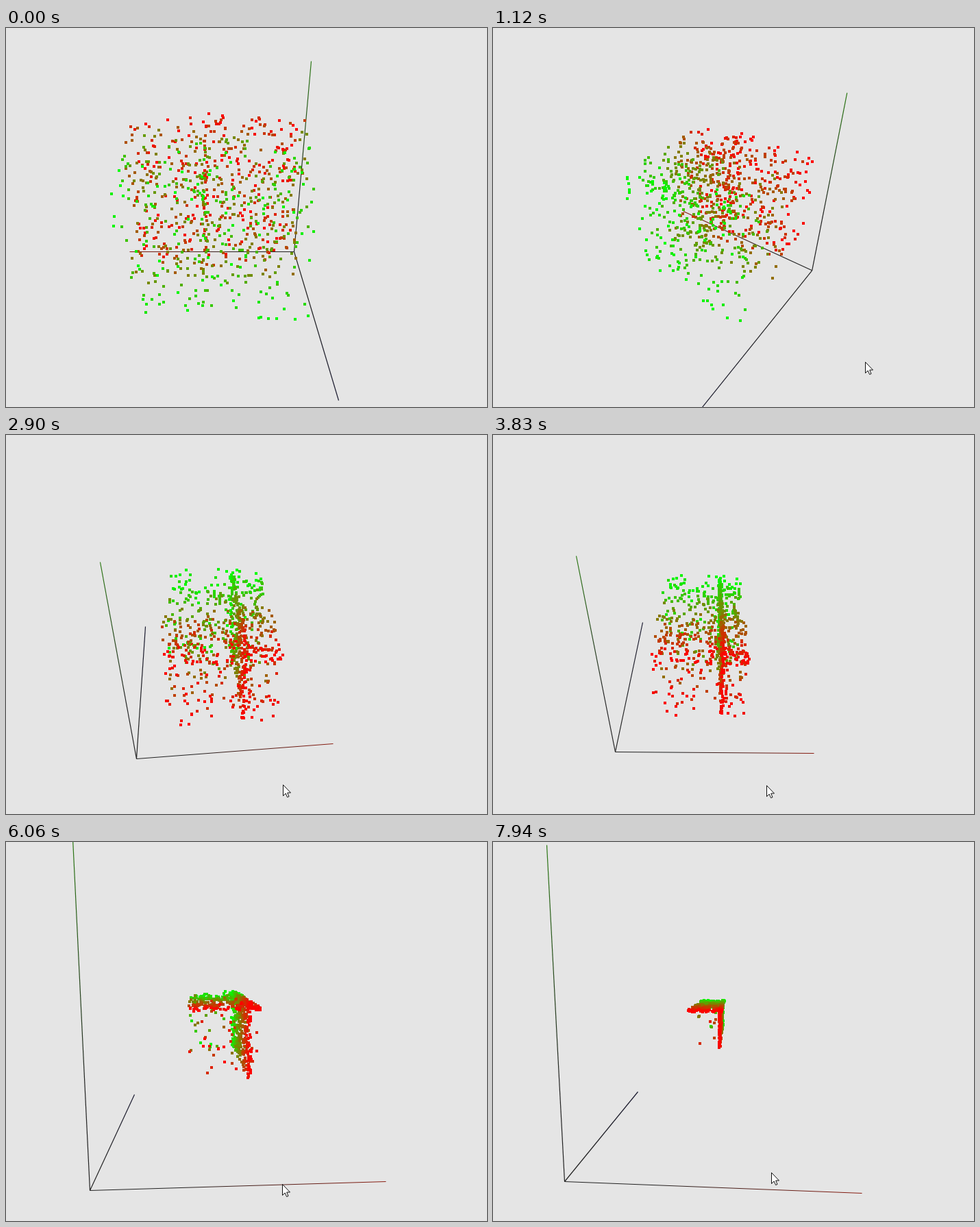
Recreate the animation shown at these times as an HTML page with a canvas. Size 702 by 553 pixels, loop 8000 ms.

```html
<!DOCTYPE html>
<html lang="en">
<head>
<meta charset="utf-8">
<title>Point cloud</title>
<style>
  html, body { margin: 0; height: 100%; overflow: hidden; background: #e5e5e5; }
  canvas { display: block; }
</style>
</head>
<body>
<canvas id="stage" width="702" height="553"></canvas>
<script>
const ctx = document.getElementById('stage').getContext('2d');
const LOOP = 8000;
const CORNER = [0.53, 0.54];   // the cloud settles on the planes x and y through here
const TIPS = ['#8a1c10', '#2c7a14', '#1a1a30'];

// yaw in degrees, screen points of origin and x, y, z tips, depth of the tips relative to the origin
const POSES = [
  [180, [420, 326], [180, 326], [445, 48], [485, 543], [1, 0.82, 0.637]],
  [138, [465, 353], [277, 267], [516, 94], [287, 576], [1.27, 0.757, 0.67]],
  [46, [305, 511], [485, 361], [303, 222], [128, 343], [1.3, 0.63, 1.34]],
  [4.6, [190, 472], [477, 450], [137, 185], [203, 279], [1.035, 0.69, 1.38]],
  [-0.5, [178, 462], [468, 464], [121, 176], [218, 273], [0.997, 0.69, 1.44]],
  [2.7, [122, 508], [554, 495], [97, -5], [187, 368], [1.035, 0.885, 1.75]],
  [-3.4, [104, 495], [538, 512], [78, 4], [211, 364], [0.955, 0.886, 1.8]]
].map(toCamera);

// time, pose number
const POSE_TRACK = [[0, 0], [850, 0], [1120, 1], [1820, 2], [2600, 2.9], [2900, 3], [3590, 4],
  [4640, 4], [5900, 5], [6950, 5], [7330, 5.9], [7940, 6]];

// time, x, y
const CURSOR_TRACK = [[500, 579, 528], [850, 579, 480], [1120, 543, 487], [1820, 443, 505],
  [2660, 404, 510], [2900, 404, 510], [3590, 399, 511], [4640, 399, 511], [5900, 403, 499],
  [6580, 403, 499], [6750, 413, 499], [7000, 412, 499], [7400, 406, 482]];

function mix(a, b, k) { return a.map((v, i) => v + (b[i] - v) * k); }

function combine(a, ka, b, kb) { return a.map((v, i) => v * ka + b[i] * kb); }

function sample(track, t) {
  const i = track.findIndex(key => key[0] > t);
  if (i < 0) return track[track.length - 1].slice(1);
  if (i === 0) return track[0].slice(1);
  const a = track[i - 1], b = track[i];
  return mix(a, b, (t - a[0]) / (b[0] - a[0])).slice(1);
}

// Homogeneous vectors with the yaw taken out, around the middle of the axes' cube
function toCamera([yaw, origin, x, y, z, depth]) {
  const o = [...origin, 1];
  const [ex, ey, ez] = [x, y, z].map((p, i) =>
    [...p, 1].map((v, j) => v * depth[i] - o[j]));
  const pivot = o.map((v, i) => v + (ex[i] + ey[i] + ez[i]) / 2);
  const r = yaw * Math.PI / 180, c = Math.cos(r), s = Math.sin(r);
  const parts = [pivot, combine(ex, c, ez, -s), ey, combine(ex, s, ez, c)];
  return [r, ...parts.map(v => v.map(n => n / pivot[2]))];
}

function cameraAt(t) {
  const [q] = sample(POSE_TRACK, t);
  const i = Math.min(Math.floor(q), POSES.length - 2), k = q - i;
  const a = POSES[i], b = POSES[i + 1];
  const yaw = a[0] + (b[0] - a[0]) * k;
  const [pivot, right, ey, ahead] = [1, 2, 3, 4].map(n => mix(a[n], b[n], k));
  const c = Math.cos(yaw), s = Math.sin(yaw);
  const ex = combine(right, c, ahead, s), ez = combine(right, -s, ahead, c);
  return (x, y, z) => {
    const [u, v, w] = pivot.map((p, j) =>
      p + ex[j] * (x - 0.5) + ey[j] * (y - 0.5) + ez[j] * (z - 0.5));
    return [u / w, v / w, w];
  };
}

let seed = 7;
function rnd() {
  seed = (seed * 1664525 + 1013904223) % 4294967296;
  return seed / 4294967296;
}

const points = Array.from({ length: 820 }, () => {
  const z = Math.pow(rnd(), 1.25), g = Math.round(z * 255);
  return {
    dx: rnd() < 0.58 ? -0.5 * rnd() : 0.39 * rnd(),
    dy: rnd() < 0.68 ? -0.54 * rnd() : 0.23 * rnd(),
    z: z * 0.6,
    onX: rnd() < 0.57,
    snap: rnd() < 0.03 ? 9 : 8.4 * rnd() - 1.3,
    jitter: (rnd() - 0.5) * 0.022,
    color: `rgb(${255 - g},${g},0)`
  };
});

function place(p, sec) {
  const s = 1 - 0.1 * sec, far = Math.pow(s, 2.6);
  const loose = Math.max(0, Math.min(1, (p.snap - sec) / 0.3));
  const shrink = d => d * (d < 0 ? s : far);
  const off = (d, pulled) => pulled ? shrink(d) * loose + p.jitter * s : shrink(d);
  return [CORNER[0] + off(p.dx, p.onX), CORNER[1] + off(p.dy, !p.onX), p.z];
}

function drawAxes(project) {
  const [ox, oy] = project(0, 0, 0);
  TIPS.forEach((tip, i) => {
    const [x, y] = project(+(i === 0), +(i === 1), +(i === 2));
    const shade = ctx.createLinearGradient(ox, oy, x, y);
    shade.addColorStop(0, '#222');
    shade.addColorStop(0.3, '#222');
    shade.addColorStop(1, tip);
    ctx.strokeStyle = shade;
    ctx.lineWidth = 1.2;
    ctx.beginPath();
    ctx.moveTo(ox + 0.5, oy + 0.5);
    ctx.lineTo(x + 0.5, y + 0.5);
    ctx.stroke();
  });
}

function drawCloud(project, sec) {
  points.map(p => [project(...place(p, sec)), p.color])
    .sort((a, b) => b[0][2] - a[0][2])
    .forEach(([[x, y], color]) => {
      ctx.fillStyle = color;
      ctx.fillRect(Math.round(x) - 2, Math.round(y) - 2, 4, 4);
    });
}

const arrow = new Path2D('M.5 .5V16.5L4.2 13L6.6 18.5L9 17.5L6.7 12H11.5Z');
function drawCursor(t) {
  if (t < CURSOR_TRACK[0][0]) return;
  const [x, y] = sample(CURSOR_TRACK, t);
  ctx.save();
  ctx.translate(Math.round(x), Math.round(y));
  ctx.fillStyle = '#fff';
  ctx.strokeStyle = '#111';
  ctx.lineWidth = 1;
  ctx.fill(arrow);
  ctx.stroke(arrow);
  ctx.restore();
}

const start = performance.now();
function draw() {
  const t = (performance.now() - start) % LOOP;
  const project = cameraAt(t);
  ctx.fillStyle = '#e5e5e5';
  ctx.fillRect(0, 0, 702, 553);
  drawAxes(project);
  drawCloud(project, t / 1000);
  drawCursor(t);
  requestAnimationFrame(draw);
}
draw();
</script>
</body>
</html>
```
